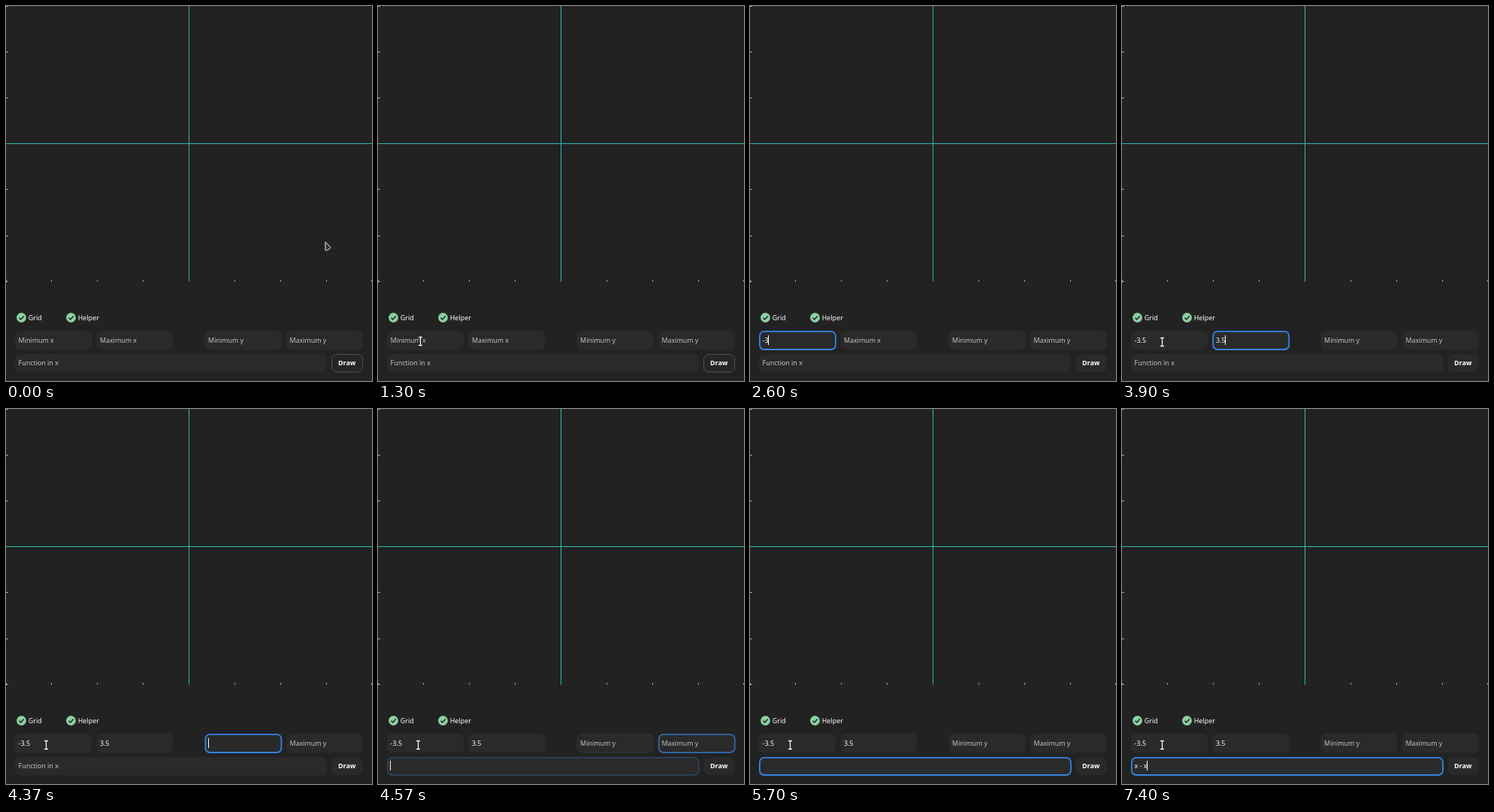
An HTML page that plays this animation: 487x500 px, repeating every 8000 ms.

```html
<!DOCTYPE html>
<html lang="en">
<head>
<meta charset="utf-8">
<title>Function plotter</title>
<style>
  html, body { margin: 0; width: 100%; height: 100%; overflow: hidden; background: #222; }
  svg { display: block; width: 100%; height: 100%; }
  text { font: 8.9px "Noto Sans", "Open Sans", sans-serif; fill: #fff; white-space: pre; }
  .hint { fill: #c4c4c4; }
  .bold { font-weight: 700; }
</style>
</head>
<body>
<svg viewBox="0 0 487 500">
  <g id="plot"></g>
  <g id="checks"></g>
  <rect id="button" x="433.5" y="464.5" width="41" height="23.5" rx="6.5"/>
  <text class="bold" x="442" y="479">Draw</text>
  <g id="fields"></g>
  <rect id="caret" width="1" height="13" fill="#fff"/>
  <path id="arrow" d="M0 0V11.2H2.6L6.6 8.2V7Z" fill="#333" stroke="#eee" stroke-linejoin="round"/>
  <g id="beam" fill="none">
    <path d="M-2.5 -5.5H2.5M0 -5.5V5.5M-2.5 5.5H2.5" stroke="#111" stroke-width="3"/>
    <path d="M-2.5 -5.5H2.5M0 -5.5V5.5M-2.5 5.5H2.5" stroke="#fff" stroke-width="1.4"/>
  </g>
</svg>
<script>
const LOOP = 8000, FADE = 250;
const $ = id => document.getElementById(id);

function add(parent, tag, attrs, text = '') {
  const el = document.createElementNS('http://www.w3.org/2000/svg', tag);
  for (const k in attrs) el.setAttribute(k, attrs[k]);
  el.textContent = text;
  return parent.appendChild(el);
}
const box = (parent, x, y, width, height, fill) => add(parent, 'rect', { x, y, width, height, fill });

// Axes and tick marks
for (let i = 0; i <= 8; i++) box($('plot'), Math.min(486, Math.floor(i * 60.9)), 365, 1, 2.5, '#aaa');
for (let i = 0; i <= 6; i++) box($('plot'), 0, Math.floor(i * 61.2), 3, 1, '#aaa');
box($('plot'), 243, 0, 1, 367, '#2abbb2');
box($('plot'), 0, 183, 487, 1, '#2abbb2');

for (const [x, label] of [[20.5, 'Grid'], [86.5, 'Helper']]) {
  add($('checks'), 'circle', { cx: x, cy: 415.5, r: 6.4, fill: '#8bd0a0' });
  add($('checks'), 'path', { d: `M${x - 3} 415.7l2.2 2.2 4-4.4`, fill: 'none', stroke: '#222', 'stroke-width': 1.5 });
  add($('checks'), 'text', { x: x + 9.3, y: 419 }, label);
}

// keys: times at which each character of the value is typed
const fields = [
  { x: 12, y: 433, w: 102, hint: 'Minimum x', focus: [1670, 3330], value: '-3.5', keys: [2000, 2600, 2900, 3200] },
  { x: 120.3, y: 433, w: 102, hint: 'Maximum x', focus: [3330, 4100], value: '3.5', keys: [3530, 3700, 3870] },
  { x: 264.5, y: 433, w: 102, hint: 'Minimum y', focus: [4100, 4385], value: '', keys: [] },
  { x: 372.8, y: 433, w: 102, hint: 'Maximum y', focus: [4385, 4535], value: '', keys: [] },
  { x: 12, y: 464, w: 415, hint: 'Function in x', focus: [4535, 1e9], value: 'x - x', keys: [6030, 6530, 6700, 6800, 7400] }
];
for (const f of fields) {
  f.h = f.y < 460 ? 25.5 : 24.5;
  add($('fields'), 'rect', { x: f.x, y: f.y, width: f.w, height: f.h, rx: 6.5, fill: '#2a2a2a' });
  f.ring = add($('fields'), 'rect', {
    x: f.x + .9, y: f.y + .9, width: f.w - 1, height: f.h - 1.4, rx: 6,
    fill: 'none', stroke: '#3584e4', 'stroke-width': 1.8
  });
  f.label = add($('fields'), 'text', { x: f.x + 4.6, y: f.y < 460 ? 449 : 479 });
}

const clamp = v => Math.max(0, Math.min(1, v));
const ramp = (t, a, b) => clamp((t - a) / (b - a));
const easeOut = p => 1 - (1 - p) ** 2;
const smooth = p => p * p * (3 - 2 * p);
const bezier = (p, a, b, c, d) =>
  a * (1 - p) ** 3 + 3 * b * p * (1 - p) ** 2 + 3 * c * p * p * (1 - p) + d * p ** 3;

function drawPointer(t) {
  const p = smooth(ramp(t, 830, 1290)), drift = ramp(t, 1300, 1630);
  const x = bezier(p, 425, 535, 330, 56.5) - 3 * drift;
  const y = bezier(p, 314.5, 430, 508, 447) + drift;
  const shown = t < 2000 || t >= 3330;
  const inField = fields.some(f => x > f.x && x < f.x + f.w && y > f.y && y < f.y + f.h);
  for (const [id, on] of [['arrow', !inField], ['beam', inField]]) {
    $(id).setAttribute('transform', `translate(${x} ${y})`);
    $(id).setAttribute('visibility', shown && on ? 'visible' : 'hidden');
  }
}

function drawField(f, t) {
  const [start, end] = f.focus;
  const focused = t >= start && t < end;
  const typed = f.value.slice(0, f.keys.filter(k => t >= k).length);
  const glow = easeOut(ramp(t, start, start + FADE)) * (1 - easeOut(ramp(t, end, end + FADE)));
  f.ring.setAttribute('opacity', glow);
  f.label.textContent = typed || (focused ? '' : f.hint);
  f.label.setAttribute('class', typed ? '' : 'hint');
  if (focused) {
    $('caret').setAttribute('x', Math.floor(f.x + 4.6 + (typed ? f.label.getComputedTextLength() : 0)));
    $('caret').setAttribute('y', f.y < 460 ? 439 : 469);
  }
}

function draw(t) {
  const lost = ramp(t, 1670, 1830);
  $('button').setAttribute('fill', lost < .5 ? '#252525' : '#2a2a2a');
  $('button').setAttribute('stroke', `rgba(80,80,80,${1 - lost})`);
  for (const f of fields) drawField(f, t);
  const blink = 1 - ramp(t, 5300, 5400) + ramp(t, 5700, 5830);
  $('caret').setAttribute('opacity', t < 1670 ? 0 : blink);
  drawPointer(t);
}

const begin = performance.now();
function tick() {
  draw((performance.now() - begin) % LOOP);
  requestAnimationFrame(tick);
}
tick();
</script>
</body>
</html>
```
